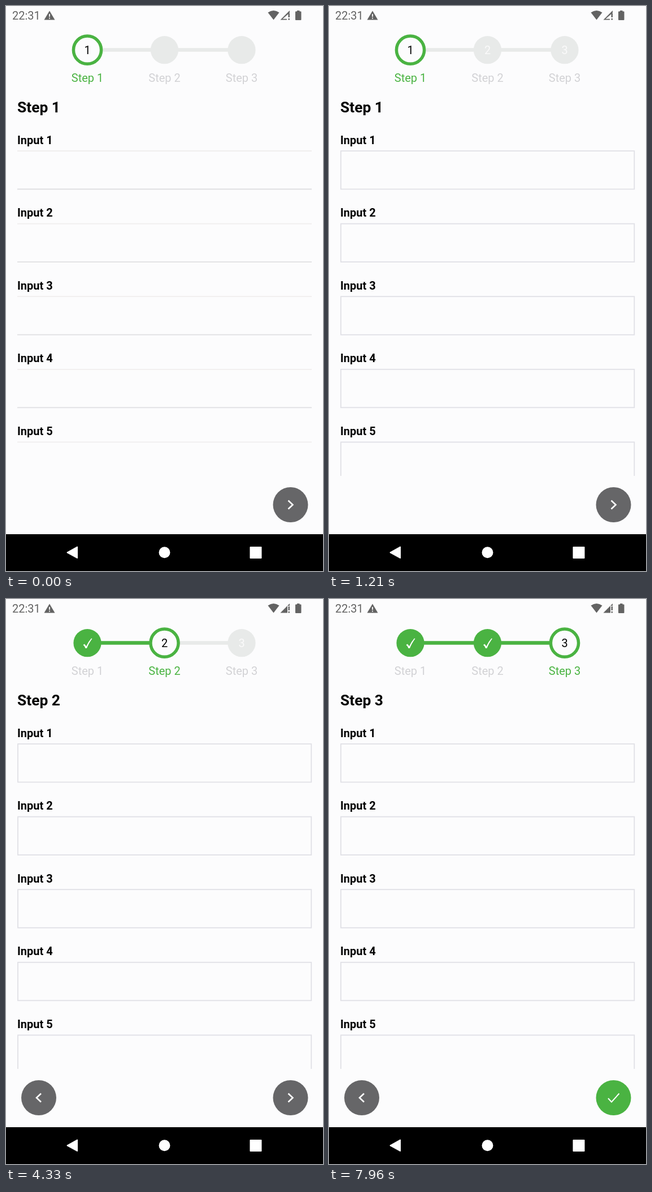
An HTML page that plays this animation: 561 px wide and 998 px high, repeating every 8 s.

```html
<!DOCTYPE html>
<html lang="en">
<head>
<meta charset="utf-8">
<title>Step form</title>
<style>
  html, body { margin: 0; width: 100%; height: 100%; overflow: hidden; background: #fcfcfd; }
  svg { display: block; width: 100vw; height: 100vh; font: 20px Roboto, sans-serif; }
  .mid { text-anchor: middle; }
  .bold { font-weight: 700; }
  .icon { fill: none; stroke: #fff; stroke-width: 2.6; }
</style>
</head>
<body>
<svg id="stage" viewBox="0 0 561 998">
  <g fill="#636363">
    <text x="11" y="24">22:31</text>
    <path d="M77 8.5 86.5 24.5H67.5Z"/>
    <path d="M77 14v5M77 20.5v2" stroke="#fcfcfd" stroke-width="1.8"/>
    <path d="M463.5 11.5Q473.500 4.500 483.500 11.500L473.500 24.500Z"/>
    <path id="weak" d="M502 8V12L489.500 22.800H497V24.500H485.500Z"/>
    <path id="strong" d="M502 8V12H498V24.500H485.500Z"/>
    <path d="M499.500 13h2.500v7h-2.500zM499.500 22h2.500v2.500h-2.500z"/>
    <path d="M515 8h4.500v1.500h2q1 0 1 1V24q0 1-1 1h-8.500q-1 0-1-1V10.500q0-1 1-1h2z"/>
  </g>
  <g id="steps"></g>
  <text id="title" class="bold" x="20" y="188" font-size="26.4"></text>
  <g id="inputs"></g>
  <rect y="830" width="561" height="103" fill="#fcfcfd"/>
  <g id="back">
    <circle cx="58" cy="881" r="31" fill="#666668"/>
    <path class="icon" d="M62 873.500 54 881l8 7.500"/>
  </g>
  <circle id="next" cx="503.500" cy="881" r="31"/>
  <path id="arrow" class="icon" d="M499.500 873.500 507.500 881l-8 7.500"/>
  <path id="done" class="icon" style="stroke-width:2" d="M494 882l6 6.500 13.500-15"/>
  <rect y="933" width="561" height="65"/>
  <g fill="#fff" stroke="#fff" stroke-width="2" stroke-linejoin="round">
    <path d="M108.500 965.300 126 955.500v19.500Z"/>
    <circle cx="280.500" cy="965.300" r="9"/>
    <rect x="432.500" y="956" width="19" height="19"/>
  </g>
</svg>
<script>
const LOOP = 8000, GREEN = '#4ab342', GREY = '#e8eae9', PAGE = '#fcfcfd';
const STEP_TIMES = [3800, 4920], SIGNAL_TIME = 2200, SETTLE_TIME = 40;
const centers = [144, 280.5, 417];
const $ = id => document.getElementById(id);
const show = (id, on) => $(id).setAttribute('visibility', on ? 'visible' : 'hidden');

function stepper(current, settled) {
  let out = '';
  for (let i = 0; i < 2; i++)
    out += `<path d="M${centers[i]} 77.600H${centers[i + 1]}" stroke="${i < current ? GREEN : GREY}" stroke-width="6.500"/>`;
  centers.forEach((x, i) => {
    const active = i === current, past = i < current;
    out += active
      ? `<circle cx="${x}" cy="77.700" r="24.600" fill="${PAGE}" stroke="${GREEN}" stroke-width="5.500"/>`
      : `<circle cx="${x}" cy="77.700" r="24.600" fill="${past ? GREEN : GREY}"/>`;
    if (past)
      out += `<path transform="translate(${x} 78)" fill="#fff" d="M-7.500 3l2.500-1.500 3 4Q2-3 7-8.500l1.500.500Q2 1-1 9h-2.500Q-5 5-7.500 3Z"/>`;
    else if (active || settled)
      out += `<text class="mid" x="${x}" y="85" fill="${active ? '#000' : '#fafafa'}">${i + 1}</text>`;
    out += `<text class="mid" x="${x}" y="133.500" fill="${active ? GREEN : '#d2d2d5'}">Step ${i + 1}</text>`;
  });
  return out;
}

function inputs(settled) {
  let out = '';
  for (let i = 0; i < 5; i++) {
    const y = 256 + i * 128.6;
    out += `<text class="bold" x="20" y="${y - 12.4}">Input ${i + 1}</text>`;
    out += settled
      ? `<rect x="21" y="${y}" width="519.300" height="67.500" fill="none" stroke="#e0e0e6" stroke-width="1.800"/>`
      : `<path d="M20 ${y}H541" stroke="#f0eeee" stroke-width="1.800"/>
         <path d="M20 ${y + 67.5}H541" stroke="#e0e0e2" stroke-width="1.800"/>`;
  }
  return out;
}

let last = '';
function draw(now) {
  const t = now % LOOP;
  const current = STEP_TIMES.filter(s => t >= s).length;
  const settled = t >= SETTLE_TIME, strong = t >= SIGNAL_TIME;
  const state = [current, settled, strong].join();
  if (state !== last) {
    last = state;
    $('steps').innerHTML = stepper(current, settled);
    $('inputs').innerHTML = inputs(settled);
    $('title').textContent = `Step ${current + 1}`;
    $('next').setAttribute('fill', current === 2 ? GREEN : '#666668');
    show('back', current > 0);
    show('arrow', current < 2);
    show('done', current === 2);
    show('weak', !strong);
    show('strong', strong);
  }
}

const start = performance.now();
function tick() {
  draw(performance.now() - start);
  requestAnimationFrame(tick);
}
tick();
</script>
</body>
</html>
```
